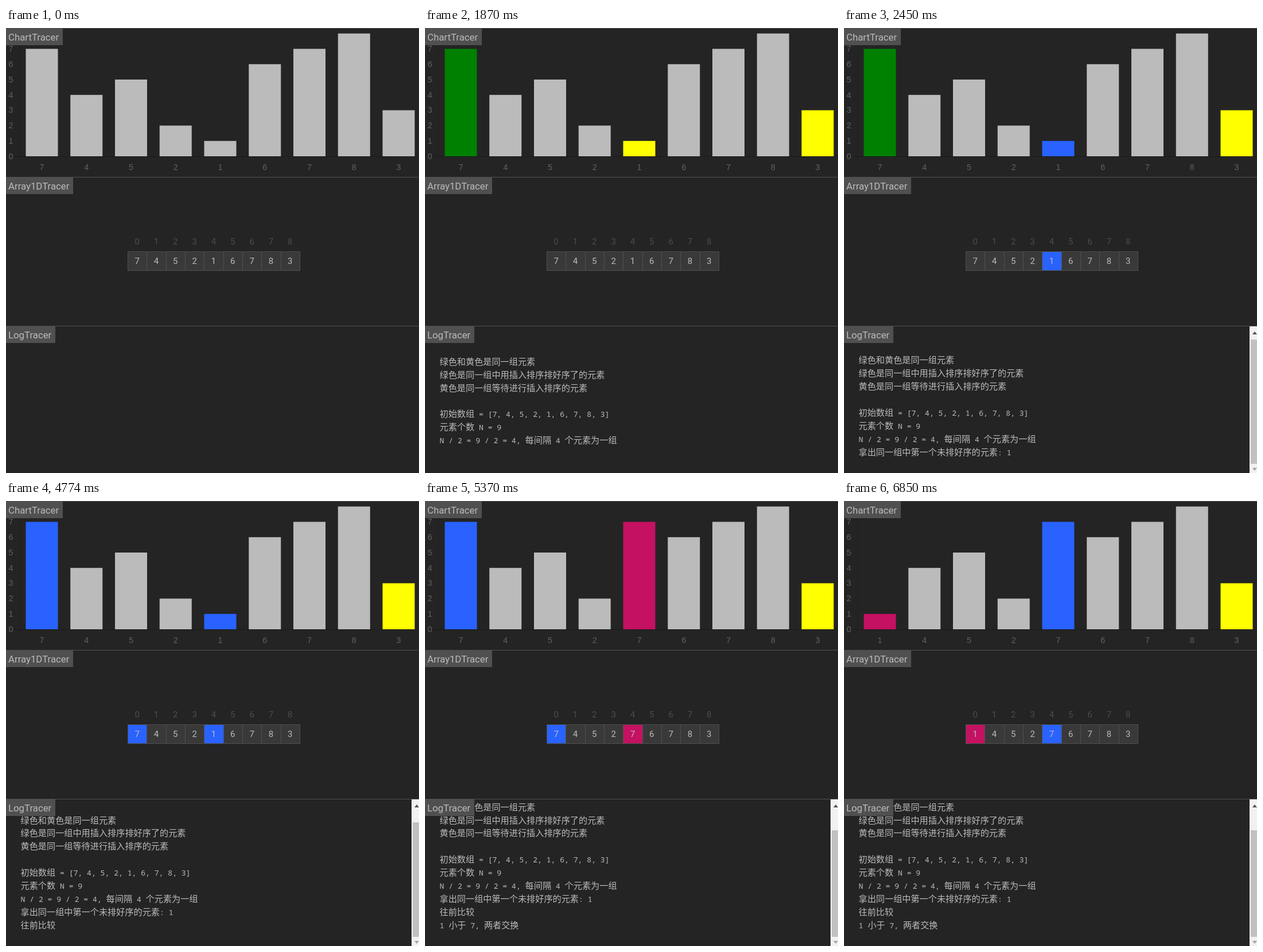
Animation of 720x777 px, one loop 8 s. Source, as an HTML page with a canvas:

```html
<!DOCTYPE html>
<html lang="zh">
<meta charset="utf-8">
<title>Sort tracer</title>
<style>
  html, body { margin: 0; height: 100%; overflow: hidden; background: #242424; }
  canvas { display: block; }
</style>
<canvas width="720" height="777"></canvas>
<script>
const ctx = document.querySelector('canvas').getContext('2d');
const ROBOTO = 'Roboto, sans-serif';
const ARIAL = '"Liberation Sans", Arial, sans-serif';
const LATIN = '13.08px "Noto Sans Mono", monospace';
const HAN = '15.16px "Noto Sans CJK SC", "Noto Sans CJK", sans-serif';
const BLUE = '#2962ff', PINK = '#c51162', GREEN = '#008000', YELLOW = '#ffff00';
const TEXT = '#bbbbbb', EDGE = '#505050', LOOP = 8000;

const log = [
  '绿色和黄色是同一组元素',
  '绿色是同一组中用插入排序排好序了的元素',
  '黄色是同一组等待进行插入排序的元素',
  '',
  '初始数组 = [7, 4, 5, 2, 1, 6, 7, 8, 3]',
  '元素个数 N = 9',
  'N / 2 = 9 / 2 = 4, 每间隔 4 个元素为一组',
  '拿出同一组中第一个未排好序的元素: 1',
  '往前比较',
  '1 小于 7, 两者交换'
];

// bars and cells map an index to its highlight colour
const steps = [
  { at: 0, lines: 0, bars: {}, cells: {} },
  { at: 1000, lines: 7, bars: { 0: GREEN, 4: YELLOW, 8: YELLOW }, cells: {} },
  { at: 2450, lines: 8, thumb: 544, bars: { 0: GREEN, 4: BLUE, 8: YELLOW }, cells: { 4: BLUE } },
  { at: 3880, lines: 9, thumb: 561, bars: { 0: BLUE, 4: BLUE, 8: YELLOW }, cells: { 0: BLUE, 4: BLUE } },
  { at: 5370, lines: 10, thumb: 575, fifth: 7, bars: { 0: BLUE, 4: PINK, 8: YELLOW }, cells: { 0: BLUE, 4: PINK } },
  { at: 6850, lines: 10, thumb: 575, first: 1, fifth: 7, bars: { 0: PINK, 4: BLUE, 8: YELLOW }, cells: { 0: PINK, 4: BLUE } }
];

function rect(x, y, w, h, color) {
  ctx.fillStyle = color;
  ctx.fillRect(x, y, w, h);
}

function text(str, x, y, font, color, align = 'center') {
  ctx.font = font;
  ctx.fillStyle = color;
  ctx.textAlign = align;
  ctx.fillText(str, x, y);
}

function panel(name, y, width) {
  rect(0, y, 720, 1, EDGE);
  rect(0, y, width, 30, EDGE);
  text(name, 4, y + 22, '16.8px ' + ROBOTO, TEXT, 'left');
}

function drawChart(values, colors) {
  const base = 224, unit = 26.8, font = '14.4px ' + ARIAL;
  rect(23, 0, 1, 236, '#1e1e1e');
  rect(13, base, 707, 1, '#1a1a1a');
  for (let n = 0; n < 8; n++) {
    const y = base - n * unit;
    if (n) rect(34, Math.round(y), 57, 1, '#212121');
    text(n, 12.4, y + 4.7, font, '#616161', 'right');
  }
  values.forEach((v, i) => {
    const x = 62.5 + i * 77.75;
    rect(x - 28, base - v * unit, 56, v * unit, colors[i] || TEXT);
    text(v, x, 248, font, '#616161');
  });
}

function drawArray(values, colors) {
  const left = 212, size = 33.33, font = '15px ' + ROBOTO;
  values.forEach((v, i) => {
    const x = Math.round(left + i * size), mid = left + (i + 0.5) * size;
    rect(x, 390, 34, 34, colors[i] || '#393939');
    text(i, mid, 377.5, font, '#4c4c4c');
    text(v, mid, 412, font, TEXT);
  });
  for (let i = 0; i <= values.length; i++) rect(Math.round(left + i * size), 390, 1, 34, EDGE);
  rect(left, 390, 301, 1, EDGE);
  rect(left, 423, 301, 1, EDGE);
}

function drawLog(count) {
  const row = 22.87, top = Math.min(583, 740.5 - (count - 1) * row);
  log.slice(0, count).forEach((line, i) => {
    let x = 25.5;
    for (const run of line.match(/[\x20-\x7e]+|[^\x20-\x7e]+/g) || []) {
      text(run, x, top + i * row + 5, run < '\x7f' ? LATIN : HAN, TEXT, 'left');
      x += ctx.measureText(run).width;
    }
  });
}

function arrow(y, dy, color) {
  ctx.fillStyle = color;
  ctx.beginPath();
  ctx.moveTo(712, y);
  ctx.lineTo(720, y);
  ctx.lineTo(716, y + dy);
  ctx.fill();
}

function drawScrollbar(thumb) {
  rect(707, 521, 13, 256, '#f1f1f1');
  rect(709, thumb, 11, 761 - thumb, '#c1c1c1');
  arrow(535, -5, '#505050');
  arrow(768, 5, '#a3a3a3');
}

function draw(now) {
  const t = now % LOOP;
  const step = steps.findLast(s => s.at <= t);
  const values = [step.first || 7, 4, 5, 2, step.fifth || 1, 6, 7, 8, 3];
  rect(0, 0, 720, 777, '#242424');
  drawChart(values, step.bars);
  drawArray(values, step.cells);
  drawLog(step.lines);
  panel('ChartTracer', 0, 99);
  panel('Array1DTracer', 260, 117);
  panel('LogTracer', 520, 86);
  if (step.thumb) drawScrollbar(step.thumb);
}

const start = performance.now();
(function tick() {
  draw(performance.now() - start);
  requestAnimationFrame(tick);
})();
</script>
</html>
```
